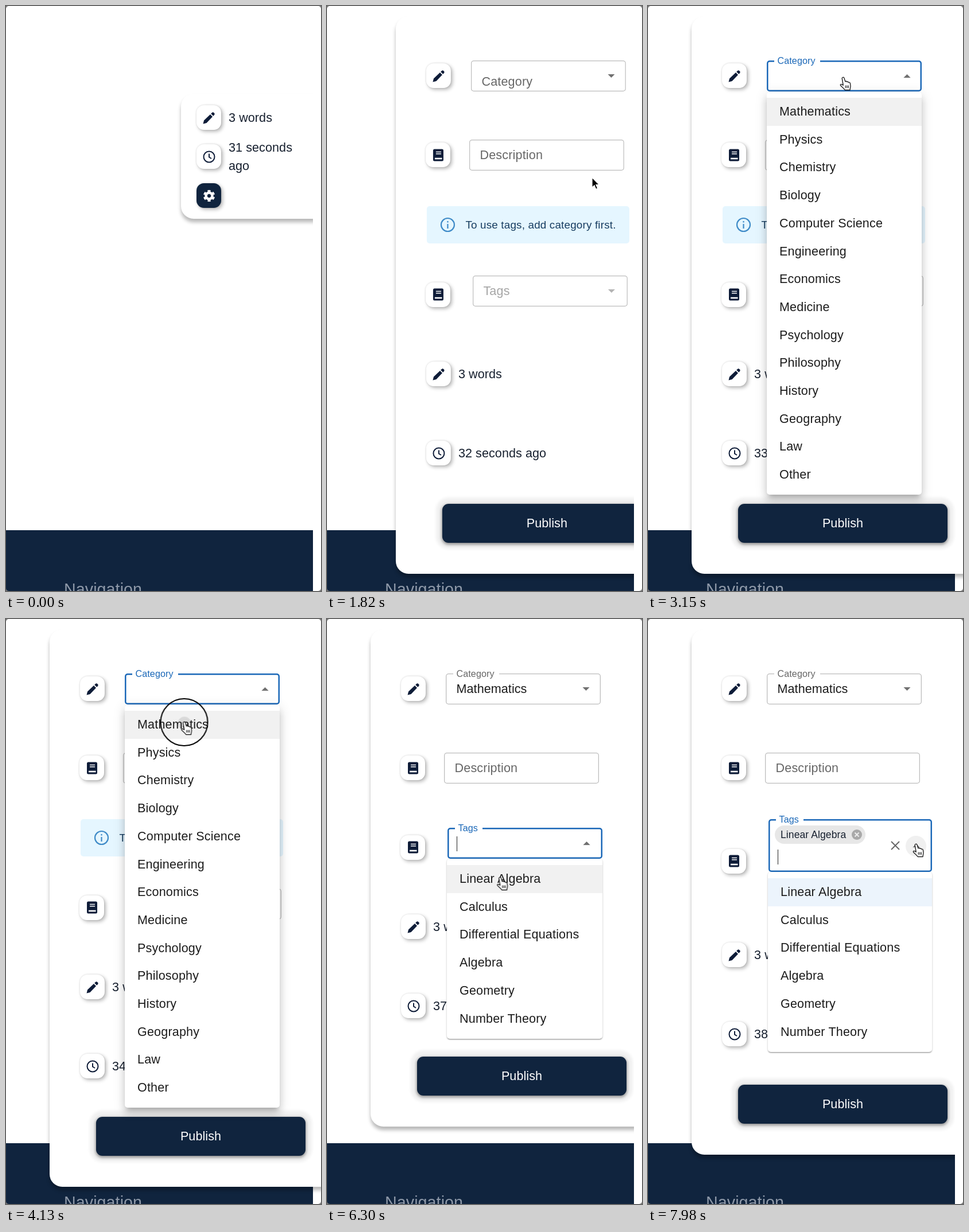
Animation of 549 by 1020 pixels, one loop 8000 ms. Source, as an HTML page:

```html
<!DOCTYPE html>
<html lang="en">
<head>
<meta charset="utf-8">
<title>Publish panel</title>
<style>
  :root { --navy: #10243e; --blue: #1b68b8; --line: #bdbdbd; }
  html, body { margin: 0; width: 100%; height: 100%; overflow: hidden; background: #fff; }
  #stage {
    --d: 0px; --book: 503px; --ty: 470px; --tw: 270px; --th: 54px;
    position: relative; width: 549px; height: 1020px; overflow: hidden; background: #fff;
    font: 21.5px "Liberation Sans", Arial, sans-serif; color: #17202f;
  }
  #stage.picked { --d: -105px; --book: 398px; --ty: 364px; }
  #stage.tagged { --d: -56px; --book: 422px; --ty: 349px; --tw: 285px; --th: 92px; }
  #stage div, #stage b, #stage svg { position: absolute; }
  #stage b { font-weight: 400; line-height: 0; white-space: pre; letter-spacing: .1px; }

  .footer { top: 914px; width: 535px; height: 106px; background: var(--navy); }
  .footer b { left: 101px; top: 102.5px; font-size: 28.6px; color: #8d98a8; }
  .clip { width: 535px; height: 1020px; overflow: hidden; }
  .wide .clip { width: 549px; }
  .layer { width: 549px; height: 1020px; }
  .panel { width: 560px; border-radius: 22px; background: #fff; box-shadow: 0 6px 6px rgba(0,0,0,.28); }
  #small { animation: leave 8s infinite; }
  #big { animation: enter 8s infinite; }
  #small .panel { left: 305px; top: 153px; height: 218px; }
  #big .panel { left: 76px; top: 18px; height: calc(972px + var(--d)); }
  #low { transform: translateY(var(--d)); }

  .ico {
    width: 43px; height: 43px; margin: -21.5px; border-radius: 13px; background: #fff; color: #0e1c38;
    box-shadow: 3px 3px 6px rgba(0,0,0,.28), 0 0 3px rgba(0,0,0,.14);
  }
  .ico svg { left: 9.5px; top: 9.5px; width: 24px; height: 24px; }
  .ico.dark { background: var(--navy); color: #fff; }

  .field { border-radius: 5px; box-shadow: inset 0 0 0 1.3px var(--line); }
  .focus { box-shadow: inset 0 0 0 2.5px var(--blue); }
  #stage .label { left: 18.5px; top: 27px; color: #666; letter-spacing: .2px; isolation: isolate; }
  #stage .up { top: 0; font-size: 16.1px; letter-spacing: .1px; }
  .up::before {
    content: ""; position: absolute; z-index: -1; left: -6px; right: -8px; top: -2px; height: 6px; background: #fff;
  }
  #stage .focus .label { color: var(--blue); }
  .arrow {
    top: calc(50% - 3.5px); width: 13px; height: 6.5px; background: #707070;
    clip-path: polygon(0 0, 100% 0, 50% 100%);
  }
  .flip { transform: scaleY(-1); }
  #cat { left: 207px; top: 95px; width: 270px; height: 54px; }
  #cat .label:not(.up) { top: 37px; }
  #cat .arrow { left: 238px; }
  #desc { left: 204px; top: 233px; width: 270px; height: 54px; }
  #tags { left: 210px; top: var(--ty); width: var(--tw); height: var(--th); }
  #tags .arrow { right: 21.5px; }
  #stage:not(.picked) #tags .label { color: #a6a6a6; }
  #stage:not(.picked) #tags .arrow { background: #b4b4b4; }
  .value { left: 18.5px; top: 27px; color: #1c1c1c; }
  #stage:not(.picked) .value, .picked .alert, #stage:not(.tagged) .tagpart,
  #stage:not(.tagOpen) #tagMenu, #stage:not(.hover) .halo { display: none; }
  #stage:not(.tagFocus) .caret { visibility: hidden; }

  .alert { left: 130px; top: 349px; width: 353px; height: 65px; border-radius: 5px; background: #e5f6ff; }
  .alert b { left: 67.5px; top: 32.5px; font-size: 18.8px; color: #173d60; }
  #stage .alert b { letter-spacing: .2px; }
  .alert svg { left: 23px; top: 19px; }
  .publish {
    left: 157px; top: 868px; width: 365px; height: 68px; border-radius: 11px; background: var(--navy);
    box-shadow: 0 2px 5px 1px rgba(0,0,0,.4), 0 0 5px 11px rgba(0,0,0,.06);
  }
  .publish b { left: 0; width: 100%; top: 34px; text-align: center; color: #fff; }

  .caret { left: 16px; bottom: 13px; width: 1px; height: 26px; background: #222; animation: blink 1s -.1s step-end infinite; }
  .chip { left: 11px; top: 11px; width: 158px; height: 32px; border-radius: 16px; background: #e7e7e7; }
  .chip b { left: 10px; top: 16px; font-size: 17.5px; }
  .chip svg { left: 134px; top: 7px; }
  .clear { left: 213px; top: 38px; }
  .halo { right: 10px; top: 28.5px; width: 36px; height: 36px; border-radius: 50%; background: #f0f0f0; }

  .menu { background: #fff; border-radius: 5px; }
  .item { width: 100%; height: 48.7px; overflow: hidden; }
  .item b { left: 22px; top: 24px; color: #1c1c1c; }
  #stage .item b { letter-spacing: .2px; }
  .item:first-child { background: #f1f1f1; }
  #catMenu {
    left: 207px; top: 150px; width: 270px; height: 702px; transform-origin: 50% 0;
    box-shadow: 0 7px 7px -4px rgba(0,0,0,.2), 0 11px 14px 1px rgba(0,0,0,.13), 0 4px 19px 3px rgba(0,0,0,.1);
    animation: grow 8s infinite;
  }
  #tagMenu {
    left: 209px; top: calc(var(--ty) + var(--th)); width: calc(var(--tw) + 1px); height: 314px;
    box-shadow: 0 2px 2px -1px rgba(0,0,0,.3), 0 1px 3px rgba(0,0,0,.25);
  }
  .tagged #tagMenu .item:first-child { background: #ecf4fc; }
  .ripple {
    left: -46px; top: -128px; width: 300px; height: 300px; border-radius: 50%; background: #000;
    animation: ripple 8s infinite;
  }

  #cursor { left: 0; top: 0; animation: travel 8s infinite; }
  #cursor svg { overflow: visible; visibility: hidden; }
  #cursor[data-kind=arrow] .k-arrow, #cursor[data-kind=hand] .k-hand, #cursor[data-kind=text] .k-text { visibility: visible; }
  .ring { left: -42px; top: -42px; width: 80px; height: 80px; border: 2px solid #000; border-radius: 50%; visibility: hidden; }
  .click .ring { visibility: visible; }
  .corners { inset: 0; border-radius: 5px; box-shadow: 0 0 0 6px #777; }

  @keyframes leave {
    0%, 17.5625% { transform: none; animation-timing-function: cubic-bezier(.333,0,.667,.333); }
    20.4625%, 100% { transform: translateX(245px); }
  }
  @keyframes enter {
    0%, 20.5% { transform: translateX(474px); animation-timing-function: cubic-bezier(.33,1,.68,1); }
    24.6%, 100% { transform: none; }
  }
  @keyframes grow {
    0%, 36.25% { opacity: 0; transform: scale(.75, .56); animation-timing-function: ease-out; }
    39.375%, 53.125% { opacity: 1; transform: none; animation-timing-function: ease-in; }
    55.625%, 100% { opacity: 0; transform: scale(.75, .56); }
  }
  @keyframes ripple {
    0%, 51.49% { opacity: 0; transform: scale(.05); }
    51.5% { opacity: .1; transform: scale(.05); }
    54.5% { opacity: .1; transform: none; }
    56%, 100% { opacity: 0; transform: none; }
  }
  @keyframes blink { 50% { opacity: 0; } }
  @keyframes travel {
    0%, 2.62% { opacity: 0; transform: translate(352px, 815px); }
    2.63% { opacity: 1; transform: translate(352px, 815px); }
    7.875%, 9.625% { transform: translate(476px, 330px); }
    11.375%, 25.375% { transform: translate(462px, 299px); animation-timing-function: ease-in; }
    29.75% { transform: translate(363px, 205px); animation-timing-function: ease-out; }
    33.25%, 41.125% { transform: translate(340px, 125px); animation-timing-function: ease-in-out; }
    47.25%, 63% { transform: translate(310.5px, 180px); animation-timing-function: ease-in-out; }
    68.25%, 73.5% { transform: translate(330px, 392px); animation-timing-function: ease-in-out; }
    77.875%, 85.75% { transform: translate(301.5px, 451px); animation-timing-function: ease-in-out; }
    92.75%, 100% { opacity: 1; transform: translate(467px, 393px); }
  }
</style>
</head>
<body>
<svg width="0" height="0" style="position:absolute">
  <symbol id="pen" viewBox="-12 -12 24 24">
    <path fill="currentColor" d="M-10.5 10.5-9 4.5 2-6 6-2-4.5 9ZM3.2-7.2 5-9a2.3 2.3 0 0 1 3.2 0l.8.8a2.3 2.3 0 0 1 0 3.2L7.2-3.2Z"/>
  </symbol>
  <symbol id="book" viewBox="-12 -12 24 24">
    <rect x="-9" y="-10.5" width="18" height="21" rx="2.5" fill="currentColor"/>
    <path stroke="#fff" stroke-width="1.6" d="M-4-5.5H5M-4-2.2H5"/>
    <path stroke="#fff" stroke-width="2.6" d="M-6 6H6.5"/>
  </symbol>
  <symbol id="clock" viewBox="-12 -12 24 24">
    <g fill="none" stroke="currentColor" stroke-width="2"><circle r="9.5"/><path d="M0-5.5V.5L4 3"/></g>
  </symbol>
  <symbol id="gear" viewBox="-12 -12 24 24">
    <g fill="none" stroke="currentColor">
      <circle r="5.5" stroke-width="4.4"/>
      <circle r="8.4" stroke-width="3.6" pathLength="60" stroke-dasharray="5.5 4.5" stroke-dashoffset="-2.2"/>
    </g>
  </symbol>
</svg>

<div id="stage">
  <div class="footer"><b>Navigation</b></div>
  <div class="clip">
    <div class="layer" id="small">
      <div class="panel"></div>
      <div class="ico" style="left:353.5px;top:194.5px"><svg><use href="#pen"/></svg></div>
      <div class="ico" style="left:353.5px;top:262.5px"><svg><use href="#clock"/></svg></div>
      <div class="ico dark" style="left:353.5px;top:330.5px"><svg><use href="#gear"/></svg></div>
      <b style="left:388px;top:195px">3 words</b>
      <b style="left:388px;top:246.5px"><span class="sec">31</span> seconds</b>
      <b style="left:388px;top:278.5px">ago</b>
    </div>

    <div class="layer" id="big">
      <div class="panel"></div>
      <div class="ico" style="left:150.5px;top:121.5px"><svg><use href="#pen"/></svg></div>
      <div class="ico" style="left:149.5px;top:259.5px"><svg><use href="#book"/></svg></div>
      <div class="ico" style="left:149.5px;top:var(--book)"><svg><use href="#book"/></svg></div>
      <div class="field" id="cat">
        <b class="label">Category</b><b class="value">Mathematics</b><div class="arrow"></div>
      </div>
      <div class="field" id="desc"><b class="label">Description</b></div>
      <div class="alert">
        <svg width="27" height="27" viewBox="-13.5 -13.5 27 27" fill="none" stroke="#3f8bc8" stroke-width="2.2">
          <circle r="11.5"/><path d="M0-1.5V6.5M0-6.5V-4"/>
        </svg>
        <b>To use tags, add category first.</b>
      </div>
      <div class="field" id="tags">
        <b class="label">Tags</b>
        <div class="caret"></div>
        <div class="chip tagpart">
          <b>Linear Algebra</b>
          <svg width="18" height="18" viewBox="-9 -9 18 18"><circle r="9" fill="#a9a9a9"/><path stroke="#ececec" stroke-width="2" d="M-3.5-3.5 3.5 3.5M3.5-3.5-3.5 3.5"/></svg>
        </div>
        <svg class="clear tagpart" width="16" height="16"><path stroke="#666" stroke-width="1.9" d="M1 1 15 15M15 1 1 15"/></svg>
        <div class="halo"></div>
        <div class="arrow"></div>
      </div>
      <div class="layer" id="low">
        <div class="ico" style="left:150.5px;top:641.5px"><svg><use href="#pen"/></svg></div>
        <div class="ico" style="left:150.5px;top:779.5px"><svg><use href="#clock"/></svg></div>
        <b style="left:185px;top:641.5px">3 words</b>
        <b style="left:185px;top:779.5px"><span class="sec">31</span> seconds ago</b>
        <div class="publish"><b>Publish</b></div>
      </div>
    </div>
  </div>
  <div class="menu" id="catMenu"></div>
  <div class="menu" id="tagMenu"></div>
  <div class="corners"></div>
  <div id="cursor" data-kind="arrow">
    <div class="ring"></div>
    <svg class="k-arrow" width="14" height="22"><path stroke="#fff" stroke-width="1.2" d="M0 0V17.5L4 13.7 6.7 20.3 9.6 19 6.9 12.7H12.3Z"/></svg>
    <svg class="k-hand" width="20" height="25" style="left:-6px;top:-2px">
      <path fill="#fff" stroke="#222" stroke-width="1.4" stroke-linejoin="round" d="M4.2 3.2a1.9 1.9 0 0 1 3.7-.6l2 6.2c.6-.9 2.6-.8 3 .5.9-.6 2.5-.2 2.8 1 1-.4 2.4 0 2.7 1.5.4 2.6 1.2 5 .2 7.6L18 23.5H9.2C7.5 20.5 4 18.5 1.6 15.5c-.8-1.2.4-2.6 1.9-1.9l2.7 1.6Z"/>
      <path stroke="#222" stroke-width="1.2" d="M10.3 15.5v4.5M12.8 15.5v4.5M15.3 15.5v4.5"/>
    </svg>
    <svg class="k-text" width="10" height="24" style="left:-5px;top:-12px"><path fill="none" stroke="#222" stroke-width="1.5" d="M1 1Q5 1 5 4V20Q5 23 1 23M9 1Q5 1 5 4V20Q5 23 9 23M3 15H7"/></svg>
  </div>
</div>

<script>
  const LOOP = 8000;
  const $ = (q) => document.querySelector(q);
  const stage = $('#stage'), cursor = $('#cursor');
  const seconds = document.querySelectorAll('.sec');

  const fillMenu = (q, top, names) => {
    $(q).innerHTML = names.map((name, i) =>
      `<div class="item" style="top:${top + i * 48.7}px"><b>${name}</b></div>`).join('');
  };
  fillMenu('#catMenu', 10, ['Mathematics', 'Physics', 'Chemistry', 'Biology', 'Computer Science',
    'Engineering', 'Economics', 'Medicine', 'Psychology', 'Philosophy', 'History', 'Geography', 'Law', 'Other']);
  fillMenu('#tagMenu', 11, ['Linear Algebra', 'Calculus', 'Differential Equations', 'Algebra', 'Geometry', 'Number Theory']);
  $('#catMenu .item').insertAdjacentHTML('beforeend', '<div class="ripple"></div>');

  // Spans of time, in ms, in which each state holds
  const spans = {
    wide: [[2900, 4450]],
    picked: [[4250, LOOP]],
    tagFocus: [[5620, LOOP]],
    tagOpen: [[5620, 6540], [7600, LOOP]],
    tagged: [[6540, LOOP]],
    hover: [[7330, LOOP]],
    click: [1080, 2800, 4120, 5550, 6460, 7520].map((t) => [t, t + 200])
  };
  const hand = [[590, 1660], [2600, 4330], [5990, 6560], [7330, LOOP]];
  const text = [[5390, 5990], [7080, 7330]];
  const ticks = [1060, 2200, 3300, 4760, 5500, 6200, 7300];

  const within = (list, t) => list.some(([a, b]) => t >= a && t < b);
  const start = performance.now();

  function draw() {
    const t = (performance.now() - start) % LOOP;
    for (const name in spans) stage.classList.toggle(name, within(spans[name], t));

    const catUp = t >= 2870, tagFocus = t >= 5620;
    $('#cat').classList.toggle('focus', catUp && !tagFocus);
    $('#cat .label').classList.toggle('up', catUp);
    $('#cat .arrow').classList.toggle('flip', catUp && t < 4250);
    $('#tags').classList.toggle('focus', tagFocus);
    $('#tags .label').classList.toggle('up', tagFocus);
    $('#tags .arrow').classList.toggle('flip', within(spans.tagOpen, t));

    cursor.dataset.kind = within(hand, t) ? 'hand' : within(text, t) ? 'text' : 'arrow';
    const count = 31 + ticks.filter((x) => t >= x).length;
    seconds.forEach((el) => { el.textContent = count; });
    requestAnimationFrame(draw);
  }
  draw();
</script>
</body>
</html>
```
